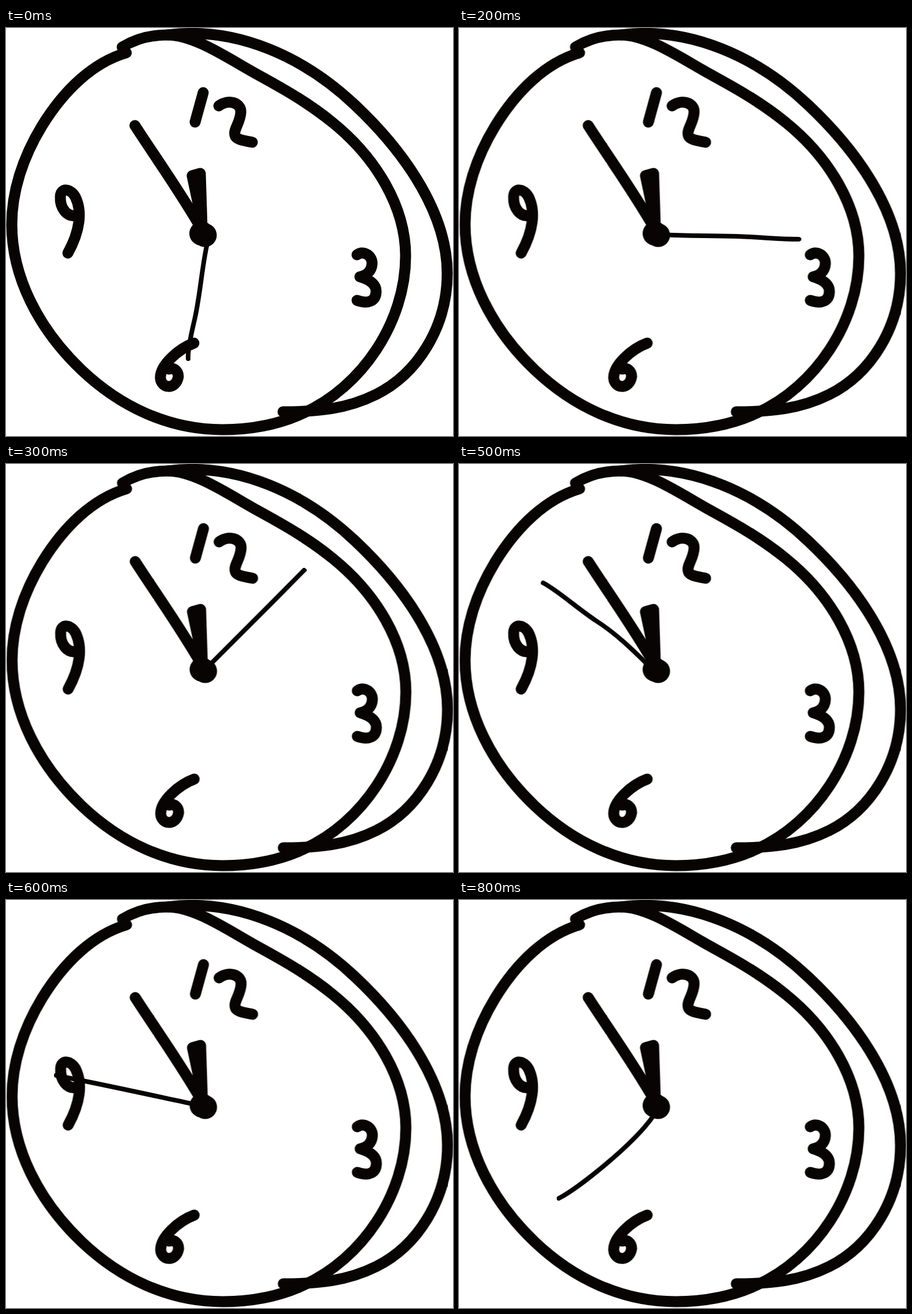
These frames come from a looping animation (773x707 px, 900 ms). An HTML page:

```html
<!DOCTYPE html>
<html lang="en">
<head>
<meta charset="utf-8">
<title>Hand-drawn clock</title>
<style>
  html, body { margin: 0; width: 100%; height: 100%; overflow: hidden; background: #fff; }
  svg { display: block; width: 773px; height: 707px; }
  path { fill: none; stroke: #080404; stroke-width: 19; stroke-linecap: round; stroke-linejoin: round; }
  circle, .hour { fill: #080404; }
  .clock { animation: nudge 900ms step-end infinite; }
  .second path {
    stroke-width: 8;
    opacity: 0;
    animation: tick 900ms step-end infinite;
    animation-delay: calc(var(--step) * 100ms - 900ms);
  }
  @keyframes tick {
    0% { opacity: 1; }
    11.1111%, 100% { opacity: 0; }
  }
  @keyframes nudge {
    0% { transform: none; }
    11.1111% { transform: translateX(.5px); }
    44.4444% { transform: translateX(-.5px); }
    55.5556% { transform: translateX(.5px); }
    77.7778% { transform: none; }
    88.8889%, 100% { transform: translateX(.5px); }
  }
</style>
</head>
<body>
<svg viewBox="0 0 773 707">
  <g class="clock">
    <!-- face and rim -->
    <path d="M208 43C150 60 100 108 62 170C28 226 10 285 10 340C10 430 55 520 130 592C196 655 280 696 374 696C440 696 485 681 515 667C615 622 691 510 691 395C691 310 640 225 565 164C520 127 470 100 430 78C380 50 325 12 279 12C250 12 222 20 201 33"/>
    <path d="M279 12C400 -4 518 52 604 134C696 221 763 326 763 425C763 520 710 600 640 635C590 660 540 665 479 665"/>

    <!-- numerals -->
    <path d="M341 112L327 163M368 135C385 122 407 130 406 146C405 165 393 175 396 186C398 194 412 195 426 198"/>
    <path d="M607 393C620 384 634 396 633 409C632 421 624 429 612 431C628 436 640 444 640 456C640 473 627 479 607 472"/>
    <path d="M325 546C298 556 267 584 267 606C268 625 294 628 298 604C298 594 290 588 282 591"/>
    <path d="M122 325C105 328 93 312 94 292C95 276 112 278 120 293C132 318 128 352 107 390"/>

    <!-- hands and hub -->
    <path d="M223 169C253 216 292 270 334 341"/>
    <path class="hour" d="M322 256L336 252L339 345L336 322Z"/>
    <circle cx="338" cy="356" r="21"/>
    <circle cx="344" cy="359" r="20.5"/>

    <g class="second">
      <path style="--step:0" d="M347 378C338 420 335 470 325 510C318 540 314 560 315 573"/>
      <path style="--step:1" d="M350 365C390 425 460 480 510 522"/>
      <path style="--step:2" d="M350 358C400 361 430 359 480 361S550 366 587 366"/>
      <path style="--step:3" d="M350 350C400 300 460 240 515 184"/>
      <path style="--step:4" d="M337 97C337 150 339 205 340 255L345 350"/>
      <path style="--step:5" d="M145 206C170 219 200 247 237 272C270 293 300 322 325 347"/>
      <path style="--step:6" d="M86 304C160 318 250 338 325 354"/>
      <path style="--step:7" d="M82 410C150 396 250 374 325 363"/>
      <path style="--step:8" d="M335 375C300 425 205 500 172 517"/>
    </g>
  </g>
</svg>
</body>
</html>
```
